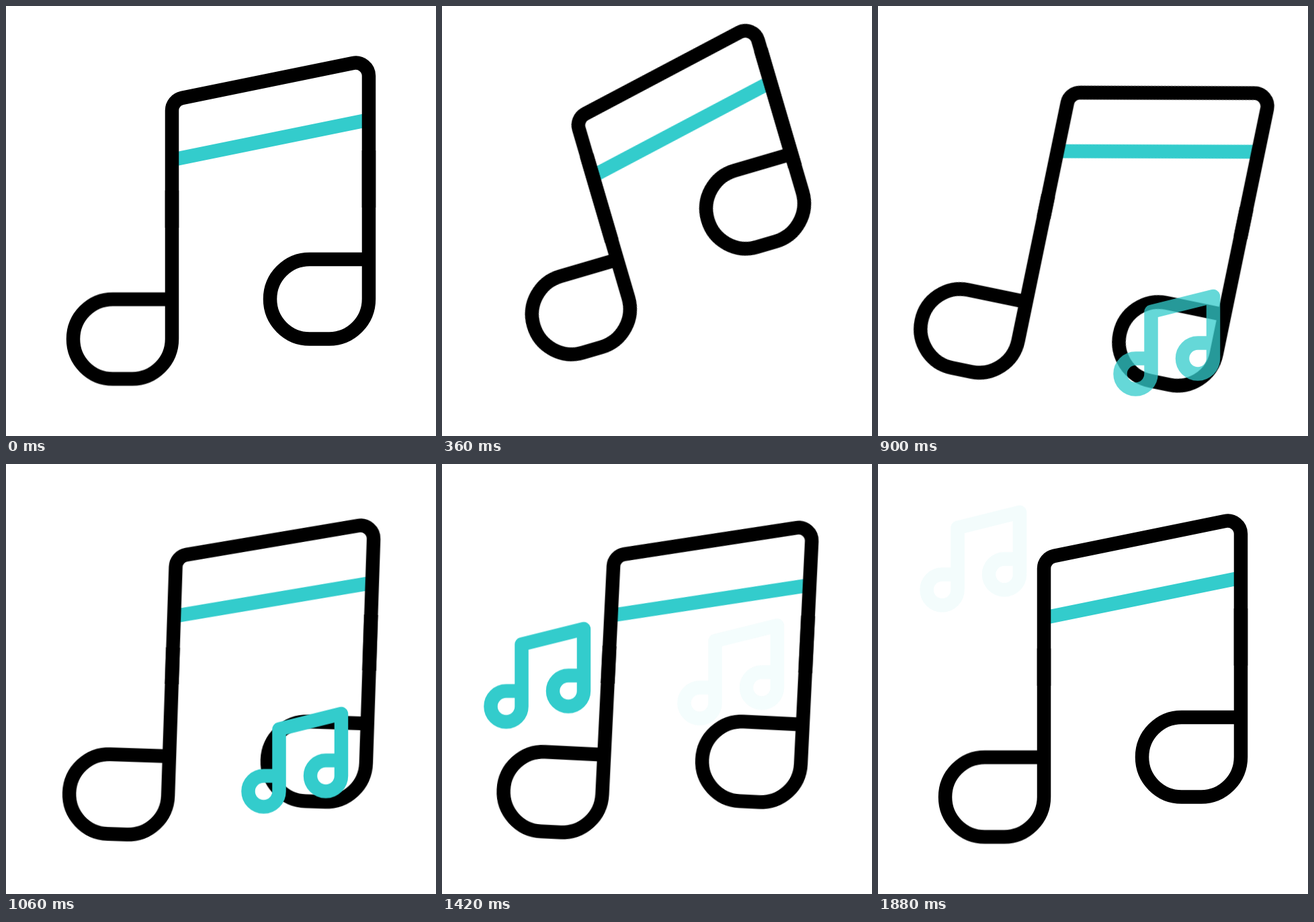
These frames come from a looping animation (640 px wide and 640 px high, 2000 ms). An HTML page:

```html
<!DOCTYPE html>
<html lang="en">
<head>
<meta charset="utf-8">
<title>Music notes</title>
<style>
  html, body { margin: 0; width: 100%; height: 100%; overflow: hidden; background: #fff; }
  svg { display: block; width: 100%; height: 100%; }

  path { fill: none; stroke-width: 20.5; }
  .ink { stroke: #000; }
  .teal { stroke: #3cc; }

  .swing, .head, .note {
    transform-box: view-box;
    animation: 2s cubic-bezier(.333, 0, .667, 1) infinite;
  }
  .swing { transform-origin: 320px 320px; animation-name: swing; }
  .head { animation-name: bounce; }
  .left { --up: -86.5px; --down: 31.6px; }
  .right { --up: -107px; --down: 59px; }

  .note { opacity: 0; stroke-linejoin: round; }
  .first { animation-name: rise1, fade1; animation-timing-function: cubic-bezier(.333, 0, .667, 1), linear; }
  .second { animation-name: rise2, fade2; animation-timing-function: cubic-bezier(.333, 0, .667, 1), linear; }

  @keyframes swing {
    0% { transform: rotate(0deg); }
    30.25% { transform: rotate(-25.4deg); }
    45.9% { transform: rotate(12deg); }
    59.15% { transform: rotate(-6deg); }
    72.15% { transform: rotate(3deg); }
    84.5%, 100% { transform: rotate(0deg); }
  }
  /* The heads slide along the stems. */
  @keyframes bounce {
    0%, 4.5% { transform: translateY(0); }
    21.3% { transform: translateY(var(--up)); }
    39.2% { transform: translateY(var(--down)); }
    54.75%, 100% { transform: translateY(0); }
  }
  @keyframes rise1 {
    0%, 40.55% { transform: translateY(203.5px); }
    71.75%, 100% { transform: translateY(0); }
  }
  @keyframes fade1 {
    0%, 40.55% { opacity: 0; }
    46.5%, 61.5% { opacity: 1; }
    71.6%, 100% { opacity: 0; }
  }
  @keyframes rise2 {
    0%, 63.55% { transform: translateY(203.5px); }
    94.75%, 100% { transform: translateY(0); }
  }
  @keyframes fade2 {
    0%, 63.55% { opacity: 0; }
    69.5%, 84.5% { opacity: 1; }
    94%, 100% { opacity: .06; }
  }
</style>
</head>
<body>
<svg viewBox="0 0 640 640">
  <defs>
    <path id="head" d="M540 215V436A59 59.5 0 0 1 481 495.5H452A59 59.25 0 0 1 452 377H540"/>
    <path id="note" d="M383.5 332.5H406.5M383.5 332.5A23 23 0 1 0 406.5 355.5V263L499 240V332.5A23 23 0 1 1 476 309.5H499"/>
  </defs>
  <g class="swing">
    <path class="teal" d="M250 228.4L536 170.1"/>
    <path class="ink" d="M247 330V155.5A19 19 0 0 1 262.2 136.9L516.5 85A19.5 19.5 0 0 1 540 104V300"/>
    <use class="ink head left" href="#head" x="-293" y="59.5"/>
    <use class="ink head right" href="#head"/>
  </g>
  <use class="teal note first" href="#note"/>
  <use class="teal note second" href="#note" x="-288" y="-168.5"/>
</svg>
</body>
</html>
```
